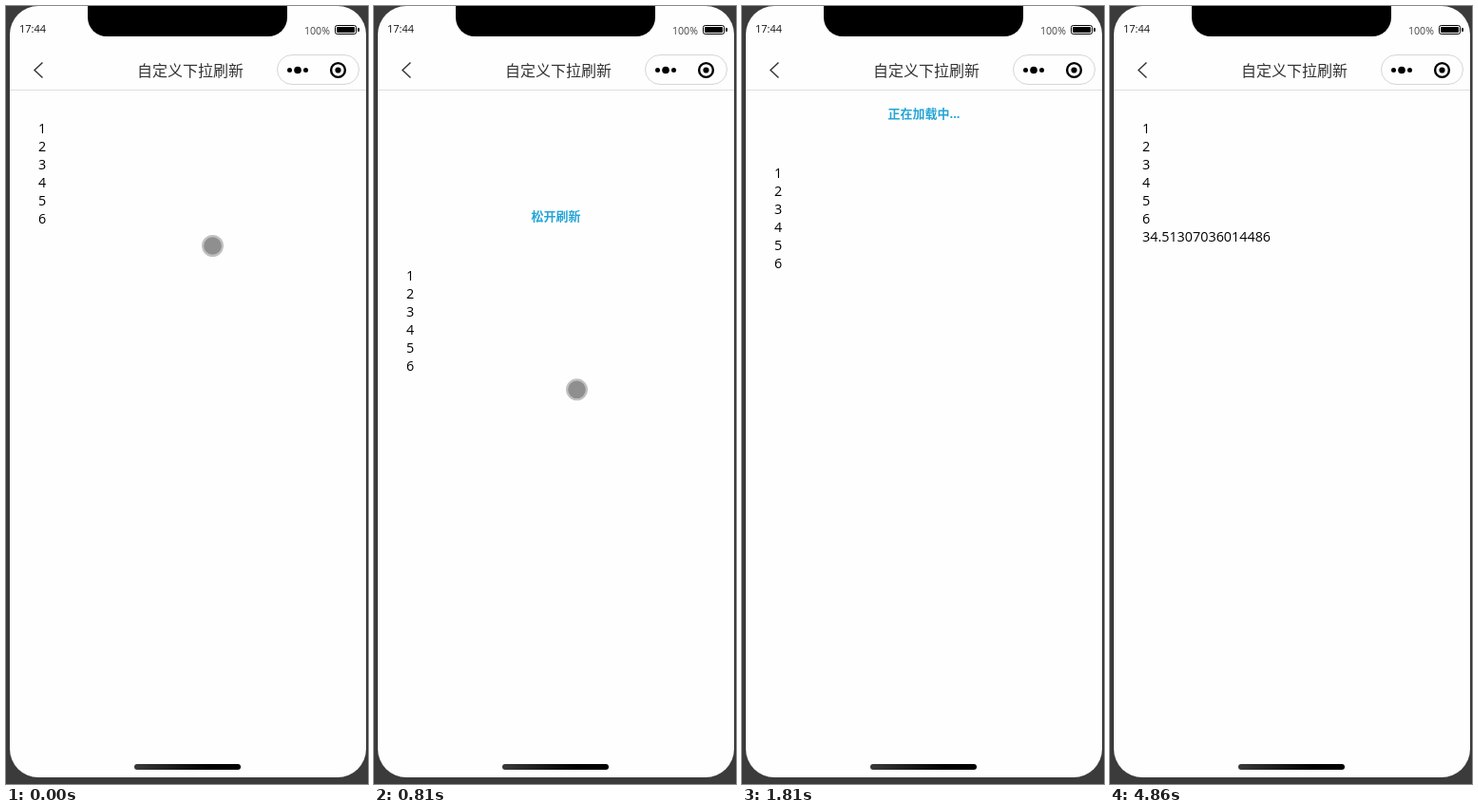
Animation, 381 px wide and 819 px high, one loop 5.49 s. Source, as an HTML page:

```html
<!DOCTYPE html>
<html lang="zh-CN">
<head>
<meta charset="utf-8">
<title>自定义下拉刷新</title>
<style>
  html, body { margin: 0; width: 100%; height: 100%; overflow: hidden; background: #3b3b3b; }
  svg { display: block; width: 381px; height: 819px; }
  text { font-family: "Open Sans", "Noto Sans CJK SC", "Noto Sans CJK", sans-serif; white-space: pre; }
  #list { font-size: 14.35px; }
  #label { font-size: 13px; font-weight: 700; fill: #25a5d6; text-anchor: middle; }
</style>
</head>
<body>
<svg viewBox="0 0 381 819">
  <defs>
    <linearGradient id="bar">
      <stop offset="0" stop-color="#3a3a3a"/>
      <stop offset=".7" stop-color="#000"/>
    </linearGradient>
  </defs>
  <rect width="381" height="819" fill="#3b3b3b"/>
  <rect x="4" width="375" height="812" rx="30" fill="#fefefe"/>

  <g id="content">
    <text id="label" x="191.5" y="71"></text>
    <g id="list"></g>
  </g>

  <rect x="4" y="34" width="375" height="54" fill="#fefefe"/>
  <rect x="4" y="88" width="375" height="1" fill="#dfdfdf"/>
  <path d="M86 0H296V12a20 20 0 0 1-20 20H106a20 20 0 0 1-20-20z"/>

  <text x="14" y="28" font-size="11" fill="#111">17:44</text>
  <text x="314" y="30" font-size="10.6" fill="#444">100%</text>
  <rect x="346.5" y="20.5" width="22" height="9" rx="2" fill="none" stroke="#000"/>
  <rect x="348" y="22" width="19" height="6" rx="1"/>
  <rect x="370" y="23" width="2" height="4" rx="1"/>

  <path d="M38.5 59.5L30 67.5L38.5 75.5" fill="none" stroke="#333" stroke-width="1.4"/>
  <text x="138" y="74" font-size="16" fill="#333">自定义下拉刷新</text>

  <rect x="285.5" y="51.5" width="86" height="31" rx="15.5" fill="#fefefe" stroke="#d6d6d6"/>
  <circle cx="298.5" cy="67.5" r="2.5"/>
  <circle cx="307" cy="67.5" r="3.8"/>
  <circle cx="315.5" cy="67.5" r="2.5"/>
  <circle cx="349.5" cy="67.5" r="7.4" fill="none" stroke="#000" stroke-width="2.4"/>
  <circle cx="349.5" cy="67.5" r="3.1"/>

  <rect x="135" y="798" width="112" height="6" rx="3" fill="url(#bar)"/>
  <circle id="cursor" r="10.4" fill="#8f8f8f" stroke="#c0c0c0" stroke-width="2.2"/>
</svg>
<script>
const LOOP = 5490, RELEASE = 825, ADDED = 3860, DONE = 4370, CLOSED = 4860;
const HELD = 47, REACH = 206;
const $ = id => document.getElementById(id);

// Progress 0..1 in equal hard steps, the first one taken at start.
const steps = (t, start, length, count) =>
  Math.max(0, Math.min(count, Math.floor((t - start) / length) + 1)) / count;

const dragged = t => REACH * (1 - (1 - steps(t, 600, 45, 8)) ** 1.39);

function pulled(t) {
  if (t >= CLOSED || t < 600) return 0;
  if (t < RELEASE) return dragged(t) + 2;
  const top = dragged(RELEASE - 1) + 2;
  return top + (HELD - top) * steps(t, RELEASE, 45, 3);
}

function labelAt(t) {
  if (t >= DONE) return "刷新完成";
  if (t >= RELEASE) return "正在加载中...";
  return pulled(t) < HELD ? "下拉刷新" : "松开刷新";
}

const rows = [1, 2, 3, 4, 5, 6, "34.51307036014486"].map((value, i) => {
  const row = document.createElementNS("http://www.w3.org/2000/svg", "text");
  row.setAttribute("x", 34);
  row.setAttribute("y", 134 + i * 19);
  row.textContent = value;
  return $("list").appendChild(row);
});

const move = (id, x, y) => $(id).setAttribute("transform", `translate(${x} ${y})`);
const show = (node, visible) => node.style.display = visible ? "" : "none";

function draw(t) {
  const drift = steps(t, 30, 66, 4);
  const leave = steps(t, 1390, 60, 7) ** 1.76;
  move("cursor", 217.5 - 4 * drift + 114 * leave, 252.5 - 2 * drift + dragged(t) + 330 * leave);
  show($("cursor"), t < 1810);
  move("content", 0, pulled(t));
  $("label").textContent = labelAt(t);
  show(rows[6], t >= ADDED);
}

const start = performance.now();
function tick() {
  draw((performance.now() - start) % LOOP);
  requestAnimationFrame(tick);
}
tick();
</script>
</body>
</html>
```
